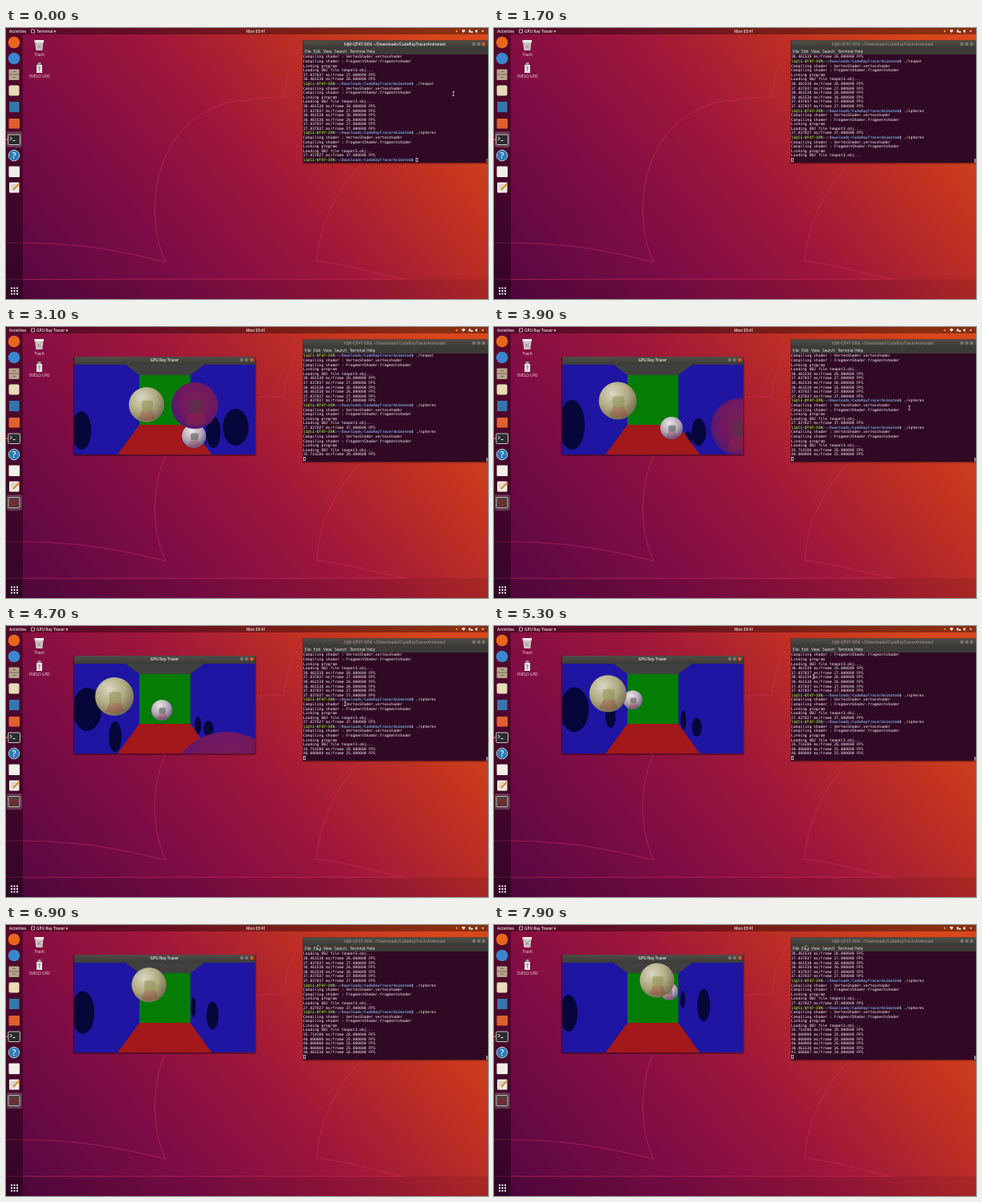
An HTML page that plays this animation: 600x338 px, repeating every 8000 ms.

```html
<!DOCTYPE html>
<html lang="en">
<head>
<meta charset="utf-8">
<title>Ray tracer on a desktop</title>
<style>
  html, body { margin: 0; width: 100%; height: 100%; overflow: hidden; background: #a0173a; }
  svg { position: absolute; left: 0; top: 0; width: 600px; height: 338px; }
  svg text { font: 4.8px "Open Sans", sans-serif; fill: #eee; }
  svg .b { font-weight: 600; }
  .mid { text-anchor: middle; }
  pre {
    position: absolute; left: 370px; top: 33.4px; width: 230px; height: 134.6px;
    margin: 0; overflow: hidden; color: #f4eef2; background: #300a24;
    font: 4.67px/5.6px "DejaVu Sans Mono", monospace;
  }
  pre .host { color: #8ae234; }
  pre .path { color: #729fcf; }
  pre i { box-shadow: inset 0 0 0 .6px #fff; }
</style>
</head>
<body>
<svg viewBox="0 0 600 338">
  <defs>
    <linearGradient id="wall" gradientUnits="userSpaceOnUse" x1="60" y1="380" x2="520" y2="-10">
      <stop offset="0" stop-color="#560841"/><stop offset=".28" stop-color="#7d0c45"/>
      <stop offset=".55" stop-color="#a0173a"/><stop offset=".8" stop-color="#c13221"/>
      <stop offset="1" stop-color="#d8481c"/>
    </linearGradient>
    <linearGradient id="bar" x2="0" y2="1"><stop stop-color="#504e47"/><stop offset="1" stop-color="#3b3a36"/></linearGradient>
    <radialGradient id="yellow" cx=".36" cy=".3" r=".75">
      <stop stop-color="#d8d7c2"/><stop offset=".55" stop-color="#b0aa80"/><stop offset="1" stop-color="#70684f"/>
    </radialGradient>
    <radialGradient id="white" cx=".4" cy=".28" r=".75">
      <stop stop-color="#e9e5e9"/><stop offset=".6" stop-color="#b3a4b2"/><stop offset="1" stop-color="#5d5285"/>
    </radialGradient>
    <radialGradient id="purple" cx=".55" cy=".42" r=".65">
      <stop stop-color="#7d1f56"/><stop offset=".6" stop-color="#701861"/><stop offset="1" stop-color="#47197c"/>
    </radialGradient>
    <clipPath id="view"><path d="M85 47H310V159H85Z"/></clipPath>
    <clipPath id="sides"><path d="M85 47H149L166 60V122L139 159H85ZM310 47H246.500L229.500 60V122L256 159H310Z"/></clipPath>
  </defs>

  <path fill="url(#wall)" d="M0 0H600V338H0Z"/>
  <path opacity=".09" d="M0 313.500H600V338H0Z"/>
  <g fill="none" stroke="#d5305f" stroke-width="1.3" opacity=".4">
    <path d="M0 268C70 267 120 272 199 292C184 262 183 222 188 195C200 130 245 92 300 90Q325 85 346 87Q349 45 372 16"/>
    <path d="M0 313.500H498C455 306 425 294 387 291C389 250 407 205 443 168"/>
  </g>

  <path fill="#000" opacity=".36" d="M0 0H600V8H0ZM0 8H21V338H0Z"/>
  <text class="b" x="4" y="5.900">Activities</text>
  <path fill="none" stroke="#eee" stroke-width=".7" d="M31.500 2H35.500V6H31.500Z"/>
  <text class="b" id="app" x="38" y="5.900"></text>
  <text class="b mid" x="311" y="5.900">Mon 03:41</text>
  <circle cx="561" cy="4" r="1.300" fill="#f08030"/>
  <path fill="#eee" d="M567 3Q569.500 1 572 3L569.500 6ZM576 2.500h2.500v3H576ZM579 4h2v2h-2ZM584 3h1l1.500-1.500v5L585 5h-1ZM592 3.200h3L593.500 5.200Z"/>

  <rect id="glow" x="1" width="19" height="20" rx="2" fill="#fff" opacity=".2"/>
  <circle cx="10" cy="18" r="7.300" fill="#e8651c"/>
  <circle cx="10" cy="38" r="7.300" fill="#3b86cf"/>
  <rect x="3.500" y="51.500" width="13" height="13.500" rx="1" fill="#b7a58d"/>
  <path fill="#776a5a" d="M4 57.500H16.500V58.500H4ZM8 54H12.500V55H8ZM8 61H12.500V62H8Z"/>
  <rect x="3.500" y="71.500" width="13" height="13" rx="2" fill="#e5dcb8"/>
  <rect x="4" y="92" width="12.500" height="13" fill="#3178ad"/>
  <rect x="3.500" y="113" width="13.500" height="12.500" rx="1" fill="#df602e"/>
  <rect x="2.800" y="133" width="14.600" height="12.500" rx="1" fill="#2d2a2e" stroke="#c9c4c0"/>
  <path d="M5 136L7.500 138L5 140M8.500 140.500H11.500" fill="none" stroke="#fff" stroke-width=".9"/>
  <circle cx="10" cy="159" r="6.800" fill="#2d7fb5" stroke="#d9e6ee" stroke-width=".8"/>
  <text class="b mid" x="10" y="162.800" style="font-size:11px">?</text>
  <rect x="3.500" y="172.500" width="13.500" height="13.500" rx="1" fill="#f2efe8"/>
  <rect x="4" y="192.500" width="12.500" height="13" rx="1" fill="#eeeae2"/>
  <path d="M6 196H13M6 198.500H12M6 201H10" stroke="#aaa" stroke-width=".7"/>
  <path d="M9 202L16.500 194" stroke="#e58a25" stroke-width="2"/>
  <circle cx="1" cy="139" r="1" fill="#e95420"/>
  <path d="M6 324.500H15M6 328H15M6 331.500H15" stroke="#fff" stroke-width="2" stroke-dasharray="2 1.500"/>

  <path d="M36 17H46.500L45.300 28H37.300Z" fill="#c9c4c2"/>
  <path d="M35.500 15H47V18H35.500Z" fill="#eeecea"/>
  <path d="M39 21L43.500 25M43.500 21L39 25" stroke="#8c8582" stroke-width=".8"/>
  <text class="mid" x="41.500" y="34.700">Trash</text>
  <path d="M38 46H45V56H38Z" fill="#e6e3e0"/><path d="M39.500 43H43.500V46H39.500Z" fill="#9c9896"/>
  <path d="M41.500 48V54M39.800 50L41.500 48L43.200 50" stroke="#777" stroke-width=".7" fill="none"/>
  <text class="mid" x="41.500" y="62.200">OVELO UFD</text>

  <rect x="369" y="15" width="232" height="154.500" rx="2" fill="#000" opacity=".35"/>
  <path d="M370 25V17Q370 15.500 371.500 15.500H600V25Z" fill="url(#bar)"/>
  <path d="M370 25H600V34H370Z" fill="#3c3b37"/>
  <text class="b mid" id="title" x="484" y="22">li@li-QT47-3XN: ~/Downloads/CudaRayTracerAnimated</text>
  <g fill="#77746b"><circle cx="582.500" cy="20" r="2.200"/><circle cx="588.500" cy="20" r="2.200"/><circle id="close" cx="594.500" cy="20" r="2.200"/></g>
  <g id="menu"></g>

  <g id="window">
    <rect x="3" y="212.500" width="14" height="13" rx="1" fill="#4a3f40" stroke="#bbb3ae"/>
    <path d="M5 216H15V223.500H5Z" fill="#7c2a2d"/><path d="M5 223L10 218L15 223" stroke="#333" fill="none"/>
    <rect x="83.500" y="37" width="228" height="124" rx="2" fill="#000" opacity=".35"/>
    <path d="M85 47V39Q85 37 87 37H308Q310 37 310 39V47Z" fill="url(#bar)"/>
    <text class="b mid" x="197.500" y="43.400">GPU Ray Tracer</text>
    <g fill="#77746b"><circle cx="293.500" cy="41" r="2.200"/><circle cx="299.500" cy="41" r="2.200"/><circle cx="306" cy="41" r="2.200" fill="#e95420"/></g>
    <g clip-path="url(#view)">
      <path fill="#1e15a3" d="M85 47H310V159H85Z"/>
      <path fill="#404040" d="M149 47H246.500L229.500 60H166Z"/>
      <path fill="#a3181a" d="M139 159L166 122H229.500L256 159Z"/>
      <path fill="#047d04" d="M166 60H229.500V122H166Z"/>
      <g id="shadows" clip-path="url(#sides)" fill="#07063a"></g>
      <g id="spheres"></g>
    </g>
  </g>
</svg>
<pre id="term"></pre>
<svg viewBox="0 0 600 338">
  <path id="scroll" d="M598 163H599.500V168H598Z"/>
  <path id="beam" d="M-1.200 -2.500H1.200M0 -2.500V2.500M-1.200 2.500H1.200" stroke="#eee" stroke-width=".7"/>
  <path id="arrow" d="M0 -2V4L1.500 2.700L2.500 5L3.500 4.500L2.500 2.300H4.300Z" fill="#111" stroke="#fff" stroke-width=".5"/>
</svg>

<script>
const $ = id => document.getElementById(id);
const set = (el, attrs) => Object.entries(attrs).forEach(([k, v]) => el.setAttribute(k, v));
const svg = (parent, tag, attrs) => {
  const el = document.createElementNS("http://www.w3.org/2000/svg", tag);
  set(el, attrs);
  return parent.appendChild(el);
};
const show = (el, on) => el.setAttribute("visibility", on ? "visible" : "hidden");

for (const [x, name] of [[372, "File"], [383, "Edit"], [395, "View"], [409, "Search"], [428, "Terminal"], [449, "Help"]])
  svg($("menu"), "text", { x, y: 30.8 }).textContent = name;

// Terminal output: [time it appears, text]
const prompt = '<b class="host">li@li-QT47-3XN</b>:<b class="path">~/Downloads/CudaRayTracerAnimated</b>$ ';
const compile = ["Compiling shader : VertexShader.vertexshader",
  "Compiling shader : FragmentShader.fragmentshader", "Linking program", "Loading OBJ file teapot3.obj..."];
const rate = fps => `${(1000 / fps).toFixed(6)} ms/frame ${fps}.000000 FPS`;
const history = [...compile, ...[27, 26].map(rate), prompt + "./teapot",
  ...compile, ...[26, 27, 26, 26, 27, 27].map(rate), prompt + "./spheres", ...compile, rate(37)];
const output = [...compile.map((line, i) => [i < 2 ? 0.7 : 1, line]),
  ...[28, 25, 25, 25, 26, 24].map((fps, i) => [2.8 + i, rate(fps)])];

function terminalText(t) {
  const cursor = "<i> </i>";
  const lines = [...history, prompt + (t < 0.1 ? "" : "./spheres") + (t < 0.7 ? cursor : "")];
  if (t >= 0.7) lines.push(...output.filter(([start]) => t >= start).map(([, line]) => line), cursor);
  return lines.slice(-24).join("\n");
}

// Smooth curve through rows of values placed at the key times; straight before the first
const keys = [3.1, 3.9, 4.7, 6, 7.9];
function track(rows, t) {
  const i = Math.max(0, keys.findLastIndex((k, n) => n < 4 && k <= t));
  const h = keys[i + 1] - keys[i], u = (t - keys[i]) / h;
  return rows[i].map((a, j) => {
    const slope = k => {
      const lo = Math.max(k - 1, 0), hi = Math.min(k + 1, 4);
      return (rows[hi][j] - rows[lo][j]) / (keys[hi] - keys[lo]);
    };
    if (u < 0) return a + slope(0) * u * h;
    const b = rows[i + 1][j], v = 1 - u;
    return a * v * v * (1 + 2 * u) + b * u * u * (3 - 2 * u) + h * u * v * (slope(i) * v - slope(i + 1) * u);
  });
}

// Spheres: x, y, radius
const spheres = [
  ["white", "#3d4a40", [[234, 136, 15], [221, 126, 14], [194, 105, 13], [160, 82, 11], [218, 83, 11]]],
  ["yellow", "#858c45", [[175, 97, 22], [154, 92, 23.5], [135, 88, 24], [157, 80, 22], [203, 69, 21.5]]],
  ["purple", "#4a3a3c", [[235, 98, 29], [306, 125, 36], [275, 204, 72], [170, 300, 90], [130, 320, 90]]],
].map(([fill, tint, path]) => {
  const el = svg($("spheres"), "g", {});
  svg(el, "circle", { r: 1, fill: `url(#${fill})` });
  // Reflected back wall and floor
  svg(el, "path", { d: "M-.25 -.2Q.05 -.3 .35 -.2Q.4 .05 .33 .3Q.05 .38 -.24 .3Q-.32 .05 -.25 -.2Z", fill: tint, opacity: 0.5 });
  svg(el, "path", { d: "M-.24 .3Q.05 .38 .33 .3L.52 .75Q.05 1 -.45 .78Z", fill: "#a03028", opacity: 0.3 });
  return { el, path };
});

// Wall shadows: x, y, horizontal and vertical radius
const shadows = [
  [[94, 129, 12, 24], [97, 122, 16, 31], [101, 104, 18, 27], [98, 108, 17, 29], [93, 110, 11, 23]],
  [[130, 165, 0, 15], [132, 155, 0, 18], [136, 138, 8, 19], [155, 86, 3, 10], [160, 80, 0, 8]],
  [[258, 131, 9, 20], [242, 139, 5, 9], [239, 124, 4, 11], [233, 111, 3, 13], [235, 93, 3, 11]],
  [[286, 125, 16, 23], [255, 131, 9, 17], [252, 128, 6, 10], [254, 123, 7, 15], [261, 100, 8, 20]],
].map(path => ({ el: svg($("shadows"), "ellipse", {}), path }));

const mouse = [[557, 82], [517, 101], [422, 97], [388, 27], [388, 27]];
let shownText;

function draw(now) {
  const t = Math.floor(now % 8000 / 100) / 10;
  const focused = t < 1, open = t >= 1.8;

  const text = terminalText(t);
  if (text !== shownText) $("term").innerHTML = shownText = text;
  $("app").textContent = focused ? "Terminal ▾" : "GPU Ray Tracer ▾";
  $("title").style.fill = focused ? "#eee" : "#969188";
  $("close").setAttribute("fill", focused ? "#e95420" : "#77746b");
  $("scroll").setAttribute("fill", focused ? "#e95420" : "#aaa");
  $("glow").setAttribute("y", open ? 209 : 129);
  show($("window"), open);

  for (const { el, path } of spheres) {
    const [x, y, r] = track(path, t);
    set(el, { transform: `translate(${x} ${y}) scale(${r})` });
  }
  for (const { el, path } of shadows) {
    const [cx, cy, rx, ry] = track(path, t);
    set(el, { cx, cy, rx: Math.max(0, rx), ry: Math.max(0, ry) });
  }

  const [x, y] = t < 3.1 ? mouse[0] : t >= 6 ? mouse[3] : track(mouse, t);
  for (const id of ["beam", "arrow"]) set($(id), { transform: `translate(${x} ${y})` });
  show($("beam"), y > 33 && (t < 0.1 || t > 3.2));
  show($("arrow"), y <= 33);
  requestAnimationFrame(draw);
}
requestAnimationFrame(draw);
</script>
</body>
</html>
```
